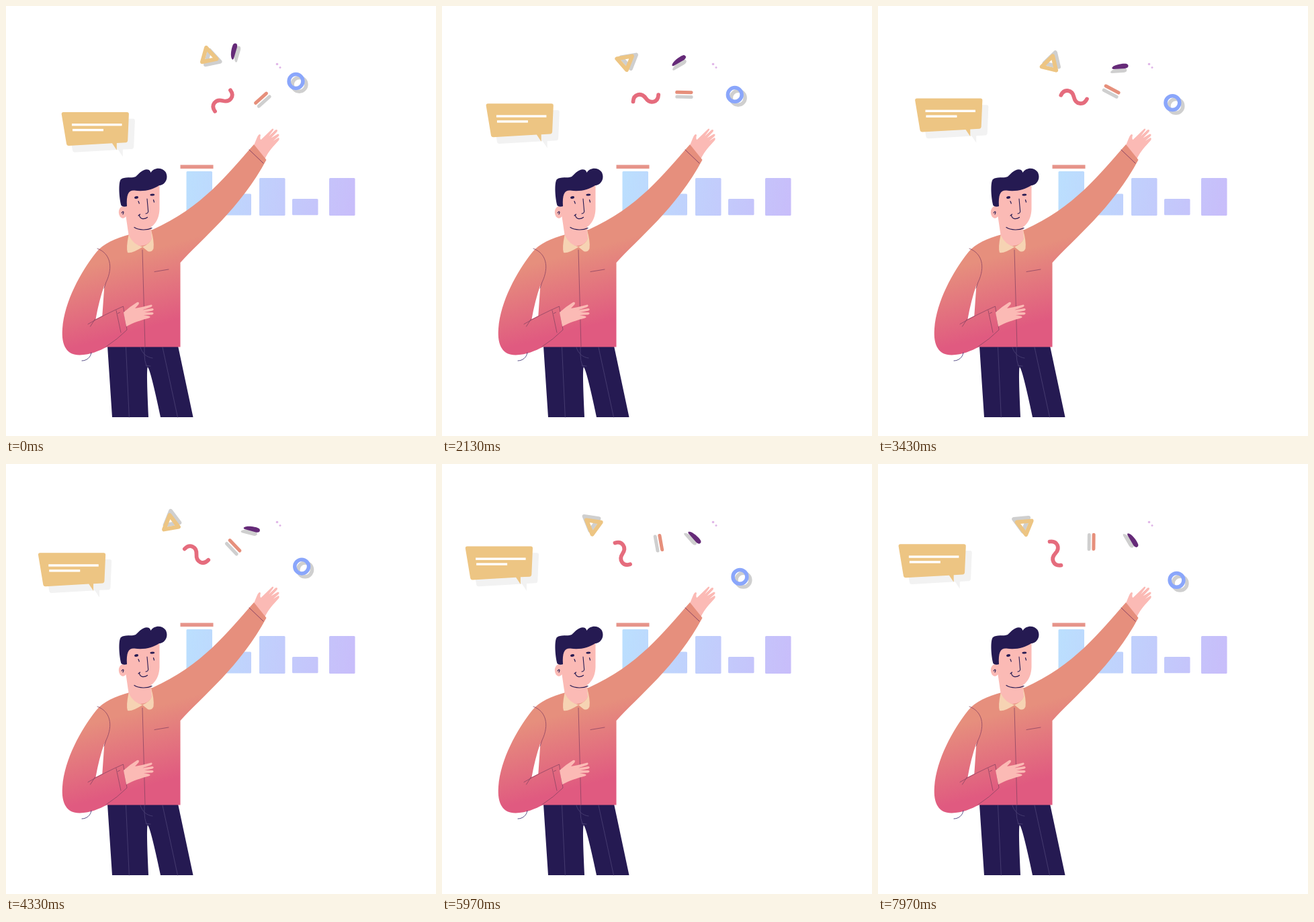
Recreate the animation shown at these times as an HTML page with a canvas. Size 640 px wide and 640 px high, loop 8 s.

```html
<!DOCTYPE html>
<html lang="en">
<head>
<meta charset="utf-8">
<title>Presenter with floating shapes</title>
<style>
  html, body { margin: 0; width: 100%; height: 100%; overflow: hidden; background: #fff; }
  canvas { display: block; width: 640px; height: 640px; }
</style>
</head>
<body>
<canvas id="stage" width="640" height="640"></canvas>
<script>
const ctx = document.getElementById('stage').getContext('2d');
const LOOP = 8000;
const TURN = 7.235; // seconds until every drift reverses

const NAVY = '#251a52', SKIN = '#fbbab5', SEAM = '#8b4463', GOLD = '#edc583';
const SHADOW = '#cfcfcf';

function fill(d, color) {
  ctx.fillStyle = color;
  ctx.fill(new Path2D(d));
}

function stroke(d, color, width) {
  ctx.strokeStyle = color;
  ctx.lineWidth = width;
  ctx.stroke(new Path2D(d));
}

function gradient(x0, y0, x1, y1, from, to) {
  const g = ctx.createLinearGradient(x0, y0, x1, y1);
  g.addColorStop(0, from);
  g.addColorStop(1, to);
  return g;
}

function ellipse(x, y, rx, ry, color, tilt = 0) {
  ctx.fillStyle = color;
  ctx.beginPath();
  ctx.ellipse(x, y, rx, ry, tilt, 0, Math.PI * 2);
  ctx.fill();
}

// Runs draw in a frame placed at x, y and turned by deg.
function at(x, y, deg, draw) {
  ctx.save();
  ctx.translate(x, y);
  ctx.rotate(deg * Math.PI / 180);
  draw();
  ctx.restore();
}

// Draws a part twice: a shifted shadow, then the part itself.
function withShadow(dx, dy, color, shade, draw) {
  at(dx, dy, 0, () => draw(shade));
  draw(color);
}

function drawChart() {
  const tone = gradient(268, 260, 520, 305, '#bbdffe', '#c8bdfa');
  const bars = [[268.5, 246, 66], [326.5, 279.5, 32], [377, 256, 56], [426, 287, 24.3], [481, 256, 56]];
  ctx.fillStyle = tone;
  for (const [x, y, h] of bars) {
    ctx.beginPath();
    ctx.roundRect(x, y, 38.5, h, 1.5);
    ctx.fill();
  }
  ctx.fillStyle = '#e6948a';
  ctx.fillRect(259.5, 236.5, 49, 5.6);
}

function drawTrousers() {
  fill('M151 506 L158 612 L212 612 Q208.5 538 211 537.5 Q215 541 230 612 L278.5 612 L256 506 Z', NAVY);
  stroke('M178.5 508 L183.3 612 M233 508 L255.5 612', '#4d4377', 0.8);
  stroke('M206 508 Q205 532 211 538 M200 508 C203 518 210 523 218 524 M208 535 L215 536', '#4d4377', 0.8);
}

function drawHands() {
  fill('M369 207 L374 195 Q377 189 379 192 Q377.5 198 379.5 199 L394 185 Q398.5 180.500 398 184.500 ' +
       'L391 194 L401 184.500 Q405 183 403.500 187 L394.500 196.500 L404.500 190.500 Q408 190.500 405.500 194 ' +
       'L397.500 201 L405.500 196 Q408 197 405.500 200.500 C398 209 392 214 385 228 Z', SKIN);
}

function drawLowerHand() {
  fill('M175 456 Q185 447 195 441 Q199 440 197.500 444 L192 450 Q204 448 216.500 444.500 Q219 446 216 448 ' +
       'L203 452.500 L218 450 Q221.500 451.500 218 453.500 L206 456 L218 456 Q221.500 457.500 217.500 459.500 ' +
       'L205 460 L213 461.500 Q216.500 463 212.500 464.500 C200 468 190 471 179 477 Z', SKIN);
}

function drawShirt() {
  const cloth = gradient(178, 372, 207, 480, '#e68f7d', '#e05a80');
  fill('M184 340 C163 346 145 353 134 367 C111 396 87 440 84 480 C82 506 91 520 110 519.500 ' +
       'C126 519 139 513 150 507.500 L259.500 507.500 L259.500 382 ' +
       'C290 348 350 300 387.500 229 L369 206 C330 250 292 300 218 333 Z ' +
       'M146.500 415 L143.300 461 L133.500 466 Q138 440 146.500 415 Z', cloth);
  stroke('M136 361 C155 368 160 388 149 411 L146 420', SEAM, 0.8);
  stroke('M203 363 L207 507 M221 395.500 L242 392', SEAM, 0.8);
  stroke('M362 214 L383 234', SEAM, 1);
  stroke('M122 473.500 Q145 460 174.500 447 L180 482 Q166 496 149 507', SEAM, 0.8);
  stroke('M164 453 L171 486 M125.500 477 L132.500 466 M166.500 457.500 L169.500 456', SEAM, 0.8);
  stroke('M127 516 C126 523 120 528 113 528', '#443a78', 0.9);
}

function drawHead() {
  fill('M178 310 L183 344 C188 361 212 361 217.500 345 L215 322 Z', SKIN);
  fill('M182.500 341 Q178.500 360 181 367 Q187 369 203.500 358.500 Q190 356 182.500 341 Z', '#f6d3b3');
  fill('M215.500 332 Q221 350 219.500 361 Q217 367 211 365 L203 358.500 Q214 354 217 346 Z', '#f6d3b3');
  ellipse(174, 307, 6.2, 9, SKIN);
  fill('M176 275 L228.500 262 L228.500 302 C228 322 216 332.500 204 333 C190 333 180 325 178 308 Z', SKIN);
  fill('M171.500 297 C168.500 286 167 265 170.500 258.500 C176 253 187 257 193 254 C200 247 206 241 213 244 ' +
       'Q215 246 215.500 248 C220 240 232 239.500 237.500 247 C243 257 236 267 228 267 ' +
       'C219 273 205 277 191 274.500 C182 274 179 281 180 298 Q175 300 171.500 297 Z', NAVY);
  ellipse(194, 285, 3, 1.8, NAVY, -0.2);
  ellipse(217.800, 281, 3.4, 1.5, NAVY, -0.05);
  stroke('M197 290.500 L198.300 294 M219.500 288.500 L220.500 292', NAVY, 1.2);
  stroke('M210 287 L211.700 306 Q211 309 208 309', NAVY, 1.1);
  stroke('M197 312 L199.500 310 M198.500 311.500 C199.500 317.500 206 318 210.500 314.500', NAVY, 1.2);
  stroke('M191 329.500 C198 334 210 334 217 330.500', NAVY, 1.2);
  stroke('M172 308 Q174.500 304.500 175 307 L174 310', NAVY, 1.1);
}

function drawPresenter() {
  drawTrousers();
  drawHands();
  drawShirt();
  drawLowerHand();
  drawHead();
}

function drawBubble(t) {
  at(82.5 - 8.02 * t, 158 - 5.95 * t, 0, () => {
    withShadow(9, 9.7, GOLD, '#f2f2f2', color => {
      fill('M3 0 H97.500 Q100.500 0 100.400 3 L98.700 42 Q98.500 45 95.500 45.200 L82.300 45.900 L82.300 56.500 ' +
           'L75.500 46.300 L11 50 Q8 50 7.500 47 L0.200 3 Q0 0 3 0 Z', color);
    });
    ctx.fillStyle = '#fff';
    ctx.fillRect(15.5, 17, 74.5, 3.4);
    ctx.fillRect(16.500, 24.900, 46, 3.4);
  });
}

function drawConfetti(t) {
  at(302.8 - 13.2 * t, 76 + 3.1 * t - 0.13 * t * t, -26.7 * t, () => {
    withShadow(5, 4, GOLD, SHADOW, color =>
      stroke('M-4.800 -14 L10.700 2.900 L-10.800 7.300 Z', color, 6));
  });

  at(338.5 + 6.3 * t, 67.5 + 6 * t + 0.15 * t * t, -74 + 20.5 * t, () => {
    withShadow(-2.6, 6, '#652a78', SHADOW, color =>
      fill('M-12 1.500 C-9 -3 4 -4.500 10 -3.200 Q13 -2 12.300 1 Q11 3.500 7 3.500 L-10 3.400 Q-12.500 3 -12 1.500 Z', color));
  });

  at(379.5 - 9 * t, 137.2 - 4.45 * t + 0.18 * t * t, -42 + 20.4 * t, () => {
    withShadow(0.3, 6.8, '#e68f7b', SHADOW, color => stroke('M-10.700 0 H10.700', color, 5));
  });

  at(322.5 - 9 * t, 141 - 2 * t + 0.12 * t * t, -54 + 18.2 * t, () => {
    stroke('M-19.500 0 C-16 -11 -4 -10.500 0 0 S16 11 19.500 0', '#e56c7d', 5.8);
  });

  at(431.5 + 2 * t, 112 + 9.36 * t, 0, () => {
    withShadow(5, 4.8, '#8aa6fb', SHADOW, color => {
      ctx.strokeStyle = color;
      ctx.lineWidth = 5.5;
      ctx.beginPath();
      ctx.arc(0, 0, 10.4, 0, Math.PI * 2);
      ctx.stroke();
    });
  });

  ellipse(403.5, 86.5, 1.8, 1.8, '#e0b6e8');
  ellipse(408, 91.5, 1.5, 1.5, '#e0b6e8');
}

function render(now) {
  const s = (now % LOOP) / 1000;
  const t = s < TURN ? s : 2 * TURN - s;
  ctx.clearRect(0, 0, 640, 640);
  ctx.lineCap = ctx.lineJoin = 'round';
  drawChart();
  drawPresenter();
  drawBubble(t);
  drawConfetti(t);
}

const start = performance.now();
function tick() {
  render(performance.now() - start);
  requestAnimationFrame(tick);
}
tick();
</script>
</body>
</html>
```
